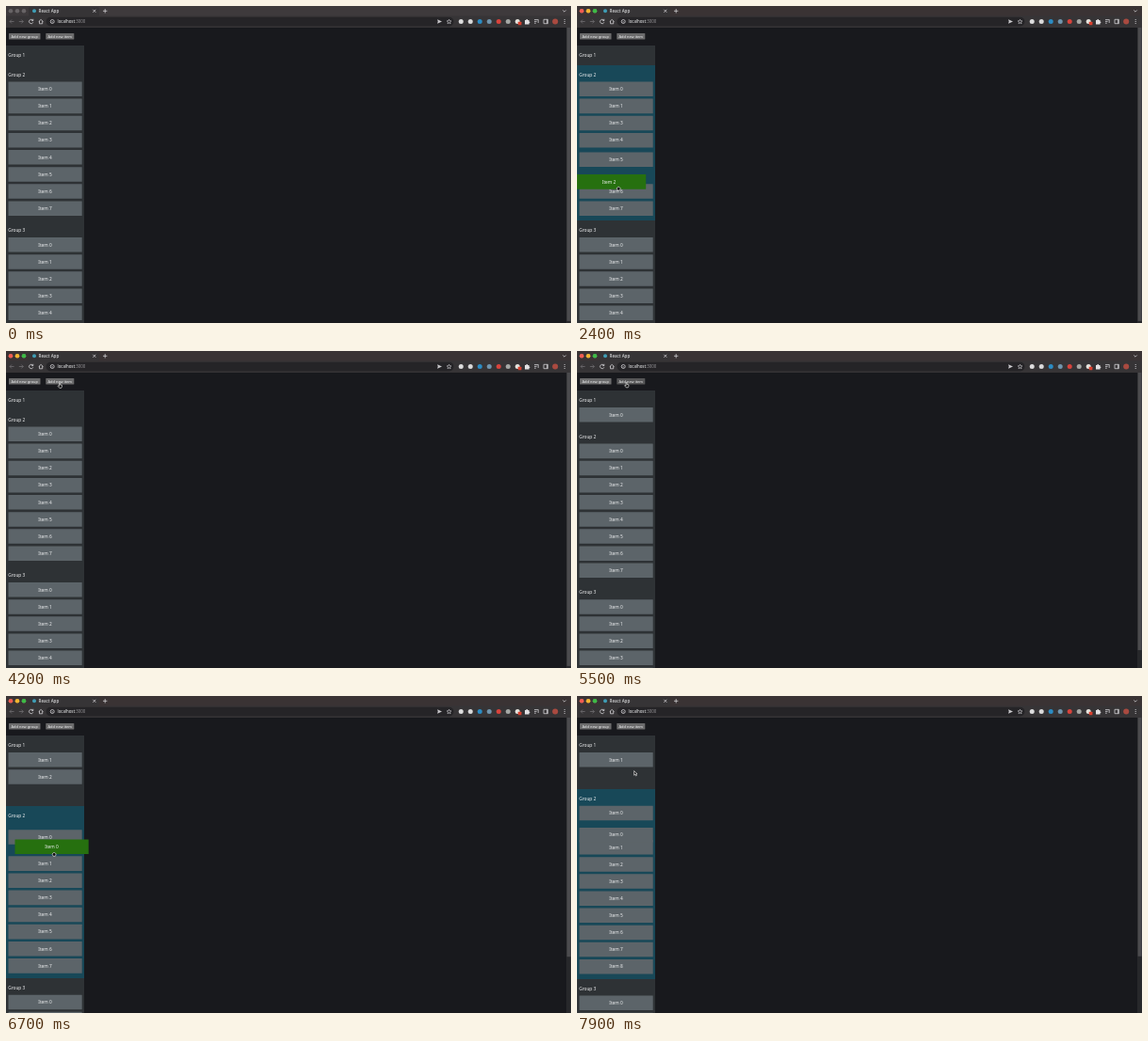
An HTML page for the animation above (8 s loop, 600 by 337 pixels).

```html
<!DOCTYPE html>
<html lang="en">
<head>
<meta charset="utf-8">
<title>React App</title>
<style>
  html, body { margin: 0; width: 100%; height: 100%; overflow: hidden; background: #18191d; }
  svg { display: block; width: 100%; height: 100%; }
  text { font-family: "Noto Sans", "Open Sans", sans-serif; font-size: 4.75px; fill: #f1f2f3; }
  .mid { text-anchor: middle; }
  .small { font-size: 3.95px; }
  .line { fill: none; stroke: #d0cfd2; stroke-width: .8; }
  .cursor { fill: #111; stroke: #fff; stroke-width: .6; stroke-linejoin: round; }
</style>
</head>
<body>
<svg id="stage" viewBox="0 0 600 337"></svg>
<script>
const LOOP = 8000, DROP = 400, SHIFT = 200, FOCUS = 1700;
const TOP = 42, EMPTY = 20.5, PITCH = 18.125, FIRST = 25.8, HALF = 7.8;
const VIEW_TOP = 23, VIEW = 314;
const COLOR = {
  group: '#2e3235', over: '#184858', item: '#5c6469', drag: '#26700f',
  button: '#6b6b6c', pressed: '#565657'
};

// Cursor moves: leave, arrive, x, y; it rests in between
const ENTRY = [584, 234];
const MOVES = [
  [100, 1500, 54, 125], [1500, 1750, 51.5, 131.5], [1990, 2508, 43.5, 198],
  [2550, 3150, 53, 95], [3200, 3680, 52, 131.5], [3720, 4200, 57.5, 36.5],
  [4200, 4500, 53, 36], [6000, 6250, 44, 75.5], [6371, 6748, 51.1, 169.5],
  [6790, 7190, 44, 74], [7205, 7385, 44, 150], [7400, 7800, 44, 157.4], [7810, 7900, 62, 82]
];
const CLICKS = [{ down: 4900, up: 5100 }, { down: 5500, up: 5600 }, { down: 5900, up: 6000 }];
const DRAGS = [
  { grab: 1750, drop: 3720, group: 1, index: 2 },
  { grab: 6371, drop: 6790, group: 0, index: 0 },
  { grab: 7205, drop: 7810, group: 0, index: 0 }
];

const mix = (a, b, p) => a + (b - a) * p;
const clamp = (v, lo = 0, hi = 1) => Math.max(lo, Math.min(hi, v));
const smooth = p => p * p * p * (p * (6 * p - 15) + 10);

// cubic-bezier(.2, 0, 0, 1)
function glide(p) {
  let lo = 0, hi = 1;
  for (let i = 0; i < 20; i++) {
    const s = (lo + hi) / 2;
    if (.6 * (1 - s) ** 2 * s + s ** 3 < clamp(p)) lo = s; else hi = s;
  }
  return lo * lo * (3 - 2 * lo);
}

function cursorAt(t) {
  let [x, y] = ENTRY;
  for (const [leave, arrive, toX, toY] of MOVES) {
    const p = smooth(clamp((t - leave) / (arrive - leave)));
    x = mix(x, toX, p);
    y = mix(y, toY, p);
  }
  return { x, y };
}

// Items per group, after the clicks and finished drags so far
function countsAt(t) {
  const counts = [0, 8, 5];
  counts[0] += CLICKS.filter(c => c.up <= t).length;
  for (const drag of DRAGS) {
    if (t < drag.drop + DROP) continue;
    counts[drag.group]--;
    counts[drag.slots.at(-1).group]++;
  }
  return counts;
}

const topOf = (counts, g) =>
  counts.slice(0, g).reduce((y, n) => y + EMPTY + n * PITCH, TOP);

// Group and index that an item held at height y would take
function slotAt(drag, counts, y) {
  const group = [2, 1, 0].find(g => !g || y > topOf(counts, g) + EMPTY / 2);
  const last = counts[group] - (group === drag.group ? 1 : 0);
  const index = clamp(Math.round((y - topOf(counts, group) - FIRST) / PITCH), 0, last);
  return { group, index };
}

for (const drag of DRAGS) {
  const counts = countsAt(drag.grab), from = cursorAt(drag.grab);
  drag.end = drag.drop + DROP;
  drag.home = topOf(counts, drag.group) + FIRST + drag.index * PITCH;
  drag.offset = t => {
    const c = cursorAt(Math.min(t, drag.drop));
    return { x: c.x - from.x, y: c.y - from.y };
  };
  drag.slots = [];
  for (let t = drag.grab; t < drag.drop; t += 5) {
    const slot = slotAt(drag, counts, drag.home + drag.offset(t).y), last = drag.slots.at(-1);
    if (!last || last.group !== slot.group || last.index !== slot.index) {
      drag.slots.push({ t, ...slot });
    }
  }
}

// A value that glides to a new target at every slot change
function follow(drag, t, target) {
  return drag.slots.reduce((value, slot) =>
    slot.t > t ? value : mix(value, target(slot), glide((t - slot.t) / SHIFT)),
  target(drag.slots[0]));
}

const stage = document.getElementById('stage');
function set(node, attrs) {
  for (const key in attrs) node.setAttribute(key, attrs[key]);
}
function add(tag, attrs, parent = stage, text) {
  const node = document.createElementNS('http://www.w3.org/2000/svg', tag);
  set(node, attrs);
  if (text !== undefined) node.textContent = text;
  return parent.appendChild(node);
}
const rect = (x, y, width, height, fill, rx = 0, parent) =>
  add('rect', { x, y, width, height, fill, rx }, parent);
const dot = (cx, cy, r, fill) => add('circle', { cx, cy, r, fill });
const line = (d, stroke = '#d0cfd2') => add('path', { d, class: 'line', style: `stroke:${stroke}` });
const label = (x, y, text, attrs = {}, parent) => add('text', { x, y, ...attrs }, parent, text);
const show = (node, on) => set(node, { display: on ? 'inline' : 'none' });
const place = (node, x, y) => set(node, { transform: `translate(${x.toFixed(2)} ${y.toFixed(2)})` });

function makeItem(name) {
  const g = add('g', {});
  const box = rect(2.5, -HALF, 78.2, 2 * HALF, COLOR.item, .3, g);
  const text = label(41.5, 1.7, name, { class: 'mid' }, g);
  return { g, box, text };
}
function makeButton(x, width, name) {
  const box = rect(x, 29, width, 6.6, COLOR.button, .6);
  label(x + width / 2, 33.7, name, { class: 'mid small' });
  return box;
}

// Board
rect(0, 0, 600, 337, '#18191d');
const groups = [1, 2, 3].map(n => {
  const bg = rect(0, 0, 83, 0, COLOR.group);
  set(bg, { 'shape-rendering': 'crispEdges' });
  return { bg, title: label(2.2, 0, `Group ${n}`) };
});
for (const group of groups) {
  group.items = Array.from({ length: 9 }, (_, i) => makeItem(`Item ${i}`));
}
const lifted = makeItem('');
makeButton(3, 33.5, 'Add new group');
const addItem = makeButton(42.3, 30, 'Add new item');

// Scrollbar
rect(595, VIEW_TOP, 5, VIEW, '#27282b');
const thumb = rect(595.6, VIEW_TOP, 4, VIEW, '#4b4b4e');

// Tab strip and toolbar
const bar = rect(0, 0, 600, 11, '#3e3a3c');
rect(24, 1, 75, 10, '#363436', 1.5);
rect(0, 10.5, 600, 12.5, '#363436');
rect(42.5, 11.8, 433, 9.6, '#252427', 4.8);
const lights = ['#f25c50', '#f4b52e', '#3dbb45'].map((color, i) => {
  dot(5 + 7 * i, 5.3, 2.3, '#686466');
  return dot(5 + 7 * i, 5.3, 2.3, color);
});
dot(30, 5.3, 2, '#3f9db5');
label(34.6, 7, 'React App', { style: 'font-size:4.6px' });
line('M92.3 3.8l3 3m0-3l-3 3M103 5.3h4.4m-2.2-2.2v4.4M591.3 4.5l1.7 1.7 1.7-1.7');
line('M8.5 16.5h-4.5m2-2l-2 2 2 2M13.8 16.5h4.5m-2-2l2 2-2 2', '#706e71');
line('M28.6 15.3a2.2 2.2 0 1 0 .2 2M28.8 13.8v1.8h-1.8M34.7 16.6l2.4-2.2 2.4 2.2M35.5 16v2.8h3.2v-2.8');
line('M51.2 16.5a2 2 0 1 0-4 0 2 2 0 1 0 4 0M49.2 16.2v1.3');
const url = label(54.5, 18.1, 'localhost', { style: 'font-size:4.4px' });
add('tspan', { fill: '#98979b' }, url, ':3000');

// Toolbar icons, ten apart
add('path', { d: 'M458 14.3l5 2.2-5 2.2.7-2.2z', fill: '#c9c8cb' });
line('M470.5 14.2l.6 1.6 1.8.1-1.4 1.2.5 1.8-1.5-1-1.5 1 .5-1.8-1.4-1.2 1.8-.1z', '#aeadb0');
['#dcdcdd', '#d9d9da', '#2b8cc4', '#7195ad', '#d8433c', '#a5a8a5', '#e4e2dc'].forEach((color, i) =>
  dot(483.2 + 10 * i, 16.5, 2.5, color));
rect(543.8, 16.8, 3.6, 3.4, '#d9402f', .5);
add('path', { d: 'M551 15h1.3a.9 .9 0 0 1 1.8 0h1.4v1.4a.9 .9 0 0 1 0 1.8v1.2h-4.5z', fill: '#e2e1e3' });
line('M561 14.6h4.4M561 16.4h2.6M561 18.2h1.8M565.2 14.6v3.4M571 14.3h4.4v4.4h-4.4zM574.4 14.3v4.4');
dot(583.2, 16.5, 3, '#a94a40');
for (let i = -1; i < 2; i++) dot(593.2, 16.5 + 2 * i, .6, '#d6d5d8');

// Cursors, centred on their own origin
const pointers = {
  arrow: 'M-1.4-2.4v4.6l1.1-1 .8 1.7 .8-.4-.8-1.6h1.5z',
  open: 'M-2 0l.8-.3v-1.4h.7l.3-.6h.7l.3.6h.7v.8h.6v1.8l-.8 1.6h-2z',
  fist: 'M-1.9.2l.6-1 .8-.6h1.2l.8.5.5.8v1.1l-.7 1.3h-2.1z',
  point: 'M-.9-2.7h.8v2l2 .6v1.5l-.7 1.4h-2l-1.6-2 .5-.6 1 .6z'
};
for (const name in pointers) pointers[name] = add('path', { d: pointers[name], class: 'cursor' });

function render(t) {
  const counts = countsAt(t), cursor = cursorAt(t);
  const drag = DRAGS.find(d => t >= d.grab && t < d.end);
  const slot = drag && drag.slots.findLast(s => s.t <= t);
  let y = TOP, overItem = false, rest = 0;

  groups.forEach((group, g) => {
    const home = drag && drag.group === g, over = slot && slot.group === g;
    const room = drag && !home ? follow(drag, t, s => s.group === g ? PITCH : 0) : 0;
    const height = EMPTY + PITCH * counts[g] + room;
    set(group.bg, { y, height, fill: over ? COLOR.over : COLOR.group });
    set(group.title, { y: y + 12.2 });
    group.items.forEach((item, i) => {
      const visible = i < counts[g] && !(home && i === drag.index);
      const rank = home && i > drag.index ? i - 1 : i;
      const push = drag ? follow(drag, t, s => s.group === g && rank >= s.index ? PITCH : 0) : 0;
      const center = y + FIRST + rank * PITCH + push;
      show(item.g, visible);
      place(item.g, 0, center);
      overItem ||= visible && cursor.x < 81 && Math.abs(cursor.y - center) < HALF;
    });
    if (over) rest = y + FIRST + slot.index * PITCH;
    y += height;
  });
  set(thumb, { height: Math.min(VIEW, VIEW * VIEW / (y - VIEW_TOP)) });

  const held = drag && t < drag.drop;
  show(lifted.g, drag);
  if (drag) {
    const { x, y: dy } = drag.offset(t);
    const left = (1 - clamp((t - drag.drop) / DROP)) ** 2;
    place(lifted.g, x * left, mix(rest, drag.home + dy, left));
    set(lifted.box, { fill: held ? COLOR.drag : COLOR.item });
    lifted.text.textContent = `Item ${drag.index}`;
  }

  const pressed = CLICKS.some(c => t >= c.down && t < c.up);
  set(addItem, { fill: pressed ? COLOR.pressed : COLOR.button });
  set(bar, { fill: t < FOCUS ? '#3e3a3c' : '#3a3334' });
  lights.forEach(light => set(light, { opacity: clamp((t - FOCUS) / 220) }));

  const kind = held ? 'fist' : cursor.y < 38 ? 'point' : overItem ? 'open' : 'arrow';
  for (const name in pointers) {
    show(pointers[name], t >= MOVES[0][0] && name === kind);
    place(pointers[name], cursor.x, cursor.y);
  }
}

const start = performance.now();
function tick() {
  render((performance.now() - start) % LOOP);
  requestAnimationFrame(tick);
}
tick();
</script>
</body>
</html>
```
